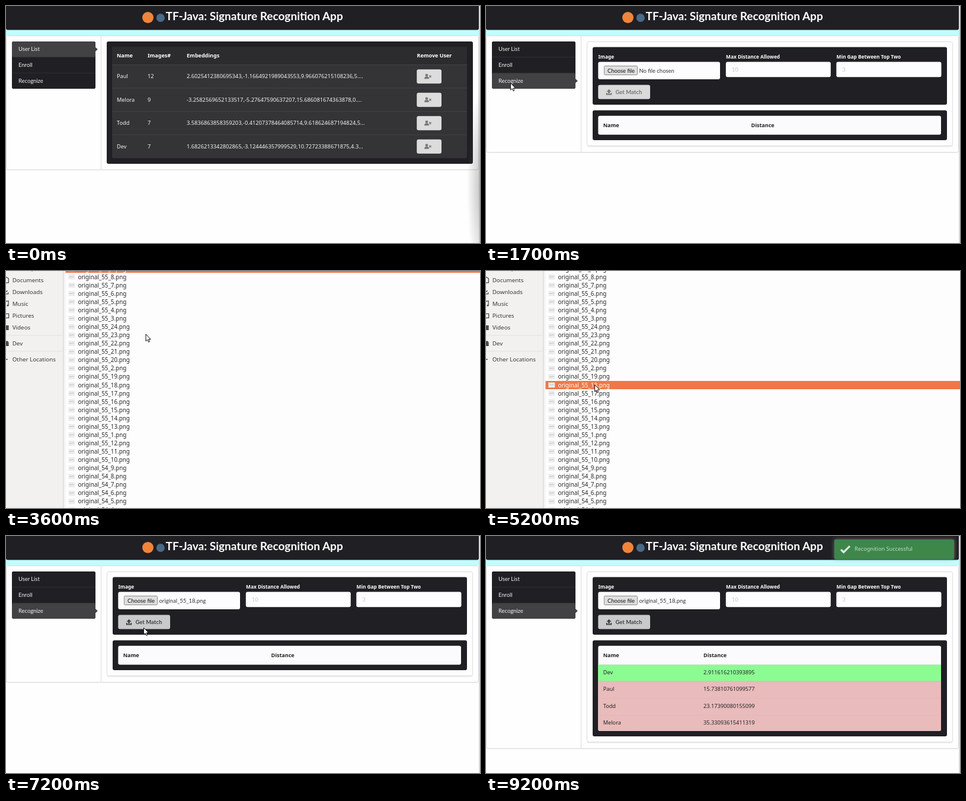
An HTML page that plays this animation: 800 by 401 pixels, repeating every 9300 ms.

```html
<!DOCTYPE html>
<html lang="en">
<head>
<meta charset="utf-8">
<title>Signature Recognition App</title>
<style>
html, body { margin: 0; width: 100%; height: 100%; overflow: hidden; background: #fefefe; }
svg { display: block; }
text { white-space: pre; }
.noto { font-family: "Noto Sans", "Open Sans", sans-serif; }
.lato { font-family: Lato, sans-serif; }
.b { font-weight: 700; }
</style>
</head>
<body>
<svg id="stage" width="800" height="401" viewBox="0 0 800 401">
  <defs>
    <radialGradient id="shade">
      <stop offset="0" stop-color="#555" stop-opacity=".4"/>
      <stop offset="1" stop-color="#555" stop-opacity="0"/>
    </radialGradient>
    <filter id="glow" x="-10%" y="-50%" width="120%" height="200%">
      <feDropShadow dx="0" dy="0" stdDeviation="3" flood-color="#999" flood-opacity=".7"/>
    </filter>
  </defs>
</svg>
<script>
const LOOP = 9300, STEP = 100;
const DARK = '#201f23', LINE = '#dcdcde', ORANGE = '#f07746', INK = '#262626';
const stage = document.getElementById('stage');

function el(parent, tag, attrs = {}, content) {
  const node = document.createElementNS('http://www.w3.org/2000/svg', tag);
  for (const k in attrs) node.setAttribute(k, attrs[k]);
  if (content !== undefined) node.textContent = content;
  parent.appendChild(node);
  return node;
}
const group = parent => el(parent, 'g');
const rect = (p, x, y, width, height, fill, rx = 0, more) =>
  el(p, 'rect', { x, y, width, height, fill, rx, ...more });
const path = (p, d, more) => el(p, 'path', { d, ...more });
const text = (p, x, y, str, size, fill, cls = 'noto') =>
  el(p, 'text', { x, y, fill, class: cls, 'font-size': size }, str);
const show = (node, on) => node.setAttribute('display', on ? 'inline' : 'none');
const paint = (node, fill) => node.setAttribute('fill', fill);

// White card with a hairline border and a soft lower edge
function card(p, x, y, w, h) {
  rect(p, x + .5, y + 1.5, w - 1, h, '#ececee', 3);
  return rect(p, x + .5, y + .5, w - 1, h - 1, '#fefefe', 3, { stroke: LINE });
}

// Page frame
const page = group(stage);
rect(page, 0, 0, 800, 401, '#fefefe');
rect(page, 0, 36, 798, 14, '#c2fdff');
rect(page, 0, -5, 798, 45.5, DARK, 3);
rect(page, 798, 0, 2, 401, '#dcdade');
el(page, 'circle', { cx: 239.5, cy: 19.5, r: 9.5, fill: '#f0843a' });
el(page, 'circle', { cx: 260.8, cy: 20, r: 7, fill: '#4a6a88' });
text(page, 269.5, 24, 'TF-Java: Signature Recognition App', 19.05, '#fff', 'lato b');

const frame = group(page);
const frameEdge = rect(frame, .5, 51.5, 797, 227, '#e8e8ea', 3);
const frameBody = rect(frame, .5, 50.5, 797, 226, '#fefefe', 3, { stroke: LINE });
const frameLine = rect(frame, 160, 51, 1, 226, LINE);

// Side menu
const menu = group(page);
rect(menu, 10, 60, 141, 80, DARK, 3);
const items = ['User List', 'Enroll', 'Recognize'].map((label, i) => {
  const y = 60 + i * 26.7;
  const bg = rect(menu, 10, y, 141, 26.6, DARK, i === 1 ? 0 : 3);
  if (i) rect(menu, 10, y - .5, 141, .8, '#343337');
  text(menu, 21, y + 16.4, label, 9.4, '#f2f2f2', 'lato');
  return { bg, y };
});
const arrow = path(menu, 'M150.5 -4L154.8 0L150.5 4Z', { fill: '#424144' });

// User list
const users = group(page);
rect(users, 170, 60, 618, 207, DARK, 3);
rect(users, 179, 69, 599, 188.5, '#343336', 3);
rect(users, 179, 69, 599, 30.5, '#2c2b2e', 3);
[[187, 'Name'], [239, 'Images#'], [305, 'Embeddings'], [693.5, 'Remove User']]
  .forEach(([x, s]) => text(users, x, 87.2, s, 9, '#fff', 'noto b'));
[
  ['Paul', 12, '2.6025412380695343,-1.1664921989043553,9.966076215108236,5....'],
  ['Melora', 9, '-3.2582569652133517,-5.27647590637207,15.686081674363878,0....'],
  ['Todd', 7, '3.5836863858359203,-0.41207378464085714,9.618624687194824,5...'],
  ['Dev', 7, '1.6826213342802865,-3.124446357999529,10.72723388671875,4.3...']
].forEach(([name, n, vec], i) => {
  const y = 119 + i * 39.5;
  rect(users, 179, y - 20, 599, .9, '#454447');
  text(users, 187, y + 3.2, name, 9.2, '#f4f4f4');
  text(users, 239, y + 3.2, n, 9.2, '#f4f4f4');
  text(users, 305, y + 3.2, vec, 9.25, '#f4f4f4');
  rect(users, 693.3, y - 11.7, 41.7, 24, '#dcdcdd', 3);
  el(users, 'circle', { cx: 710, cy: y - 2, r: 2.3, fill: '#777' });
  path(users, `M706 ${y + 4.3}q0 -4 4 -4t4 4z`, { fill: '#777' });
  path(users, `M714.3 ${y - 1.5}l3.2 3.2m0 -3.2l-3.2 3.2`, { stroke: '#777', 'stroke-width': 1.3 });
});

// Recognize form
const form = group(page);
const formCards = [false, true].map(full => {
  const g = group(form);
  card(g, 170, 60, 618, full ? 289 : 177);
  rect(g, 180, 176.5, 598, full ? 162.5 : 50.5, DARK, 3);
  rect(g, 189.3, 185.8, 578.7, full ? 144 : 32, '#fbfafd', 3);
  text(g, 197.7, 204.5, 'Name', 9, '#222', 'noto b');
  text(g, full ? 367 : 447.5, 204.5, 'Distance', 9, '#222', 'noto b');
  return g;
});
[
  ['Dev', '2.911616210393895'],
  ['Paul', '15.73810761099577'],
  ['Todd', '23.17390080155099'],
  ['Melora', '35.33093615411319']
].forEach(([name, dist], i) => {
  const g = formCards[1], y = 217.2 + i * 28.15;
  rect(g, 189.3, y, 578.7, 28.15, i ? '#e9bbbb' : '#8bfc91', i === 3 ? 2 : 0);
  rect(g, 189.3, y, 578.7, .8, i ? '#d9b0b0' : '#e0e8e0');
  text(g, 197.7, y + 17, name, 9.2, '#252525');
  text(g, 367, y + 17, dist, 9.2, '#252525');
});
rect(form, 180, 69.5, 598, 97.5, DARK, 3);
[[189.3, 205.7, 29.5, 'Image'], [404.8, 177, 25.8, 'Max Distance Allowed', '10'],
 [591.3, 177.2, 25.8, 'Min Gap Between Top Two', '3']].forEach(([x, w, h, label, hint]) => {
  text(form, x + .3, 88.5, label, 8.3, '#fff', 'noto b');
  rect(form, x, 94.4, w, h, '#fdfcfe', 3);
  if (hint) text(form, x + 10, 110.7, hint, 9.5, '#c8c7ca', 'lato');
});
rect(form, 199.5, 101.5, 56, 15, '#dfdfdf', 1, { stroke: '#8c8c8c' });
text(form, 205, 112.7, 'Choose file', 9.35, '#111', 'lato');
const fileName = text(form, 258.5, 112.7, '', 9.45, '#333', 'lato');
const matchBg = rect(form, 189.3, 133.6, 87.7, 24, '#d8d8d9', 3);
const matchInk = group(form);
path(matchInk, 'M207.5 140.8l4 4.2h-2.6v3.4h-2.8v-3.4h-2.6zM202.8 147h2v1.9h5.4v-1.9h2v3.6h-9.4z');
el(matchInk, 'text', { x: 218.5, y: 149, 'font-size': 9.5, class: 'lato b' }, 'Get Match');

// Toast
const toast = group(page);
rect(toast, 588, 6, 202, 33.3, '#3e874c', 2, { filter: 'url(#glow)' });
path(toast, 'M599 23l4.6 4.4L614 17.2', { fill: 'none', stroke: '#dfe9e1', 'stroke-width': 3.2 });
text(toast, 622, 25.4, 'Recognition Successful', 9.15, '#c3dbc8');

const shade = el(page, 'ellipse', { cx: 805, cy: 305, rx: 27, ry: 165, fill: 'url(#shade)' });

// File chooser
const files = group(stage);
rect(files, 0, 0, 800, 401, '#fefdfe');
rect(files, 0, 0, 97, 401, '#f2f1f0');
rect(files, 96.5, 0, 1, 401, '#c3c1c0');
rect(files, 97.5, 0, 3, 401, '#f4f3f3');
[['Desktop', -4.7], ['Documents', 15.3], ['Downloads', 35.4], ['Music', 55.5], ['Pictures', 75.6],
 ['Videos', 95.8], ['Dev', 122.5], ['Other Locations', 149.3]]
  .forEach(([s, y]) => text(files, 10.7, y + 3.6, s, 9.8, '#383838'));
[108.5, 135.5].forEach(y => rect(files, 0, y, 96, .8, '#dddcda'));
path(files, 'M-2 10.8H2L4.3 13V19.8H-2M-2 38.8H3.6V36M0 35.5L2.5 33M-1 59.5V51.5L4 50.5V58M-2 72.3H4.6V79.3H-2M-2 149.5H2.8',
  { fill: 'none', stroke: '#4a4a4a', 'stroke-width': 1.3 });
path(files, 'M-1 92H4.6V100H-1ZM-1 118.5H3L4.6 121V127H-1Z', { fill: '#4a4a4a' });
el(files, 'circle', { cx: 3, cy: 58.3, r: 1.5, fill: '#4a4a4a' });

const run = (a, b) => Array.from({ length: a - b + 1 }, (_, i) => a - i);
const names = [
  ...[...run(9, 3), ...run(24, 20), 2, ...run(19, 13), 1, ...run(12, 10)].map(n => '55_' + n),
  ...run(9, 4).map(n => '54_' + n)
];
const rows = names.map((n, i) => {
  const y = 10 + (i - 1) * 14.07;
  const bg = rect(files, 100.5, Math.round(y) - 7, 699.5, 14, ORANGE);
  rect(files, 105.3, y - 4.3, 11, 8.6, '#ececec');
  path(files, `M107 ${y + .4}l2 -1 1.6 .8 2 -.9 2 .7`, { fill: 'none', stroke: '#b4b4b4', 'stroke-width': .8 });
  const label = text(files, 121.5, y + 3.6, `original_${n}.png`, 9.85, INK);
  return { bg, label };
});
const PICK = names.indexOf('55_18');

const cursor = path(stage, 'M0 0V11.6L2.7 9.2L4.5 13.3L6.4 12.5L4.6 8.5H8.2Z',
  { fill: '#fff', stroke: '#111', 'stroke-width': 1, 'stroke-linejoin': 'round' });

// Pointer trips: each list holds [time, x, y] and the pointer hides outside them
const trips = [
  [[400, 796, 262], [1000, 41.5, 130.5], [2100, 41.5, 130.5], [2400, 120, 138], [2700, 236, 107],
   [3700, 236, 107], [4000, 200, 160], [4500, 190, 306], [5000, 183.5, 192.5],
   [5400, 183.5, 192.5], [5500, 283.5, 230.5], [5599, 283.5, 230.5]],
  [[6800, 283.5, 230.5], [7300, 226.5, 146.5], [8599, 226.5, 146.5]]
];
const clamp = v => Math.max(0, Math.min(1, v));
const ramp = (t, a, b) => clamp((t - a) / (b - a));
const ease = k => k * k * (3 - 2 * k);

function pointer(t) {
  for (const trip of trips) {
    const i = trip.findIndex(k => k[0] > t);
    if (i < 1) continue;
    const [a, b] = [trip[i - 1], trip[i]], k = ease(ramp(t, a[0], b[0]));
    return [a[1] + (b[1] - a[1]) * k, a[2] + (b[2] - a[2]) * k];
  }
  return null;
}

function draw(t) {
  const active = t < 1500 ? 0 : 2, done = t >= 7700, chosen = t >= 6500;
  const pos = pointer(t);
  const over = (x, y, w, h) => pos && pos[0] >= x && pos[0] < x + w && pos[1] >= y && pos[1] < y + h;

  const bottom = active === 0 ? 277 : done ? 359.5 : 247.5;
  frameEdge.setAttribute('height', bottom - 50.5);
  frameBody.setAttribute('height', bottom - 50.5);
  frameLine.setAttribute('height', bottom - 51);

  items.forEach(({ bg, y }, i) =>
    paint(bg, i === active ? '#424144' : over(10, y, 141, 26.7) ? '#323134' : DARK));
  arrow.setAttribute('transform', `translate(0 ${items[active].y + 13.3})`);

  show(users, active === 0);
  show(form, active === 2);
  show(formCards[0], !done);
  show(formCards[1], done);
  fileName.textContent = chosen ? 'original_55_18.png' : 'No file chosen';

  const hot = t >= 7500 || (chosen && over(189, 133, 88, 24));
  paint(matchBg, hot ? '#c9cacc' : chosen ? '#e0e1e2' : '#dadadb');
  paint(matchInk, hot ? '#404041' : chosen ? '#656566' : '#767677');

  toast.setAttribute('opacity', ramp(t, 7850, 8250));
  show(shade, t < 1100);

  const open = ramp(t, 3200, 3500) * (1 - ramp(t, 6400, 6700));
  show(files, open > 0);
  files.setAttribute('opacity', open);
  const picked = t < 5100 ? 0 : PICK;
  rows.forEach(({ bg, label }, i) => {
    show(bg, i === picked);
    paint(label, i === picked ? '#fff' : INK);
  });

  show(cursor, pos);
  if (pos) cursor.setAttribute('transform', `translate(${pos[0]} ${pos[1]})`);
}

function tick() {
  const t = performance.now() % LOOP;
  draw(Math.floor(t / STEP) * STEP);
  requestAnimationFrame(tick);
}
tick();
</script>
</body>
</html>
```
